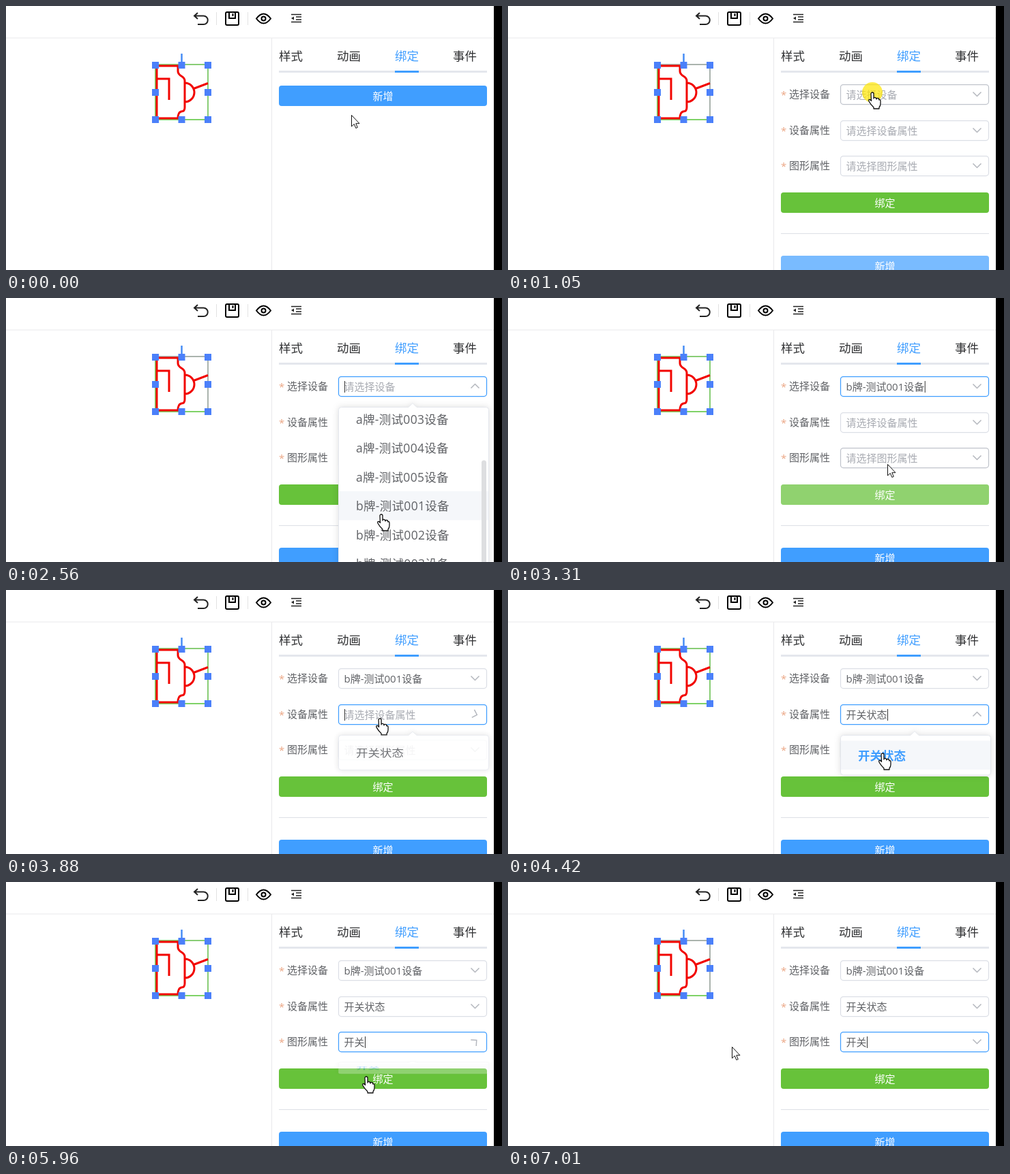
An HTML page for the animation above (7080 ms loop, 727 by 388 pixels).

```html
<!DOCTYPE html>
<html lang="zh-CN">
<head>
<meta charset="utf-8">
<style>
html, body { margin: 0; width: 100%; height: 100%; overflow: hidden; background: #fff; }
svg { display: block; }
text { font: 15px "Open Sans", "Noto Sans CJK SC", "Noto Sans CJK", sans-serif; fill: #606266; }
.big { font-size: 17.5px; }
.mid { text-anchor: middle; fill: #fff; }
.line { fill: none; stroke: #222; stroke-width: 2; }
.panel { filter: drop-shadow(0 0 5px rgba(0,0,0,.13)); }
</style>
</head>
<body>
<svg id="stage" width="727" height="388">
  <path d="M0 47H715M389.500 47V388" stroke="#e9e9eb" fill="none"/>
  <path d="M308.500 9V28M354.500 9V28" stroke="#e2e2e2"/>
  <path class="line" d="M281 10L276 14.500L281 19M276 14.500H289.500a6.200 6.200 0 0 1 0 12.500H281"/>
  <g class="line">
    <rect x="322" y="9" width="19" height="19" rx="2" stroke="#000"/>
    <path d="M327 9V18H336V9M332.500 11V15" stroke="#000"/>
    <path d="M367 18.500Q377.500 4.500 388 18.500Q377.500 32.500 367 18.500Z" stroke="#000"/>
    <circle cx="377.500" cy="18.500" r="3" stroke="#000"/>
    <path d="M418 12.500H433M425 16H433M425 20H433M418 23.500H433" stroke-width="1.600"/>
    <path d="M422 15.500V20.500L418 18Z" fill="#222" stroke="none"/>
  </g>

  <path id="edge" d="M219 86H296V167" fill="none" stroke-width="1.500"/>
  <path d="M219 86V167H296" fill="none" stroke="#55c436" stroke-width="1.600"/>
  <path d="M221 88H252V96Q252 100 257 103T262 110V149Q262 155 257 155Q252 156 252 165H221ZM221 107H239V138M262 113A14 14 0 0 1 262 141M275 121.500L296 113.500" fill="none" stroke="#f20500" stroke-width="3"/>
  <path d="M257.500 70V84" stroke="#468cf5" stroke-width="2.500"/>
  <g id="handles" fill="#4b80fa"></g>

  <g id="tabs"></g>
  <path d="M400 96.500H705" stroke="#e4e7ed" stroke-width="3"/>
  <path d="M570 96.500H605" stroke="#409eff" stroke-width="3"/>

  <g id="form">
    <g id="rows"></g>
    <g id="bind"></g>
    <path d="M400 334.500H705" stroke="#dcdfe6"/>
  </g>
  <g id="add"></g>
  <g id="panels"></g>
  <rect x="715" width="12" height="388"/>
  <circle id="press" r="15" fill="#ffe600" opacity=".7"/>
  <g id="cursor" fill="#fff" stroke="#111" stroke-linejoin="round">
    <path id="arrow" d="M.5 .5V17L4.300 13.500L6.800 19.500L9.300 18.500L6.800 12.700H12Z"/>
    <path id="hand" stroke-width="1.300" d="M-2 2a2 2 0 0 1 4 0v7q0-2 2-1.500 2 .3 2 2.500 .2-2 2-1.500 2 .3 1.800 2.500 2-1 2.200 1.500v4q0 3-2 5.500v2h-8v-2q-5-5-7-9-1-2.500 1-2.500 1.500 0 2.500 2z"/>
  </g>
</svg>
<script>
const LOOP = 7080, ROW = 42.5, SCROLL = 97;
const NS = 'http://www.w3.org/2000/svg';
const $ = id => document.getElementById(id);
const clamp = v => Math.max(0, Math.min(1, v));
const ramp = (t, a, ms) => clamp((t - a) / ms);
const smooth = u => u * u * (3 - 2 * u);
const between = (t, a, b) => t >= a && t < b;
const fade = (t, a, b) => ramp(t, a, 100) - ramp(t, b, 100);
const show = (el, on) => el.setAttribute('visibility', on ? 'inherit' : 'hidden');

function make(parent, tag, attrs, content) {
  const el = document.createElementNS(NS, tag);
  for (const k in attrs) el.setAttribute(k, attrs[k]);
  if (content) el.textContent = content;
  parent.append(el);
  return el;
}

function button(g, label, color) {
  const box = { x: 400, width: 305, height: 30, rx: 4 };
  make(g, 'rect', { ...box, fill: color });
  const glow = make(g, 'rect', { ...box, fill: '#fff' });
  make(g, 'text', { x: 552.5, y: 20.5, class: 'mid' }, label);
  return glow;
}

for (const x of [219, 257.5, 296]) for (const y of [87, 127, 167])
  if (x != 257.5 || y != 127)
    make($('handles'), 'rect', { x: x - 5, y: y - 5, width: 10, height: 10 });

['样式', '动画', '绑定', '事件'].forEach((s, i) =>
  make($('tabs'), 'text', { x: 400 + 85 * i, y: 80, class: 'big', style: 'fill:' + (i == 2 ? '#409eff' : '#303133') }, s));

const addGlow = button($('add'), '新增', '#409eff');
const bindGlow = button($('bind'), '绑定', '#67c23a');
$('bind').setAttribute('transform', 'translate(0 274)');

const devices = [...'ab'].flatMap(c => [1, 2, 3, 4, 5].map(n => `${c}牌-测试00${n}设备`));
const selects = [
  { label: '选择设备', y: 115, open: 1110, close: 2930, blur: 3760, items: devices, pick: 5, height: 342 },
  { label: '设备属性', y: 168, open: 3760, close: 4430, blur: 5220, items: ['开关状态'], pick: 0, height: 59 },
  { label: '图形属性', y: 220, open: 5220, close: 5880, blur: LOOP, items: ['开关'], pick: 0, height: 59 }
];

for (const s of selects) {
  const g = make($('rows'), 'g', { transform: `translate(0 ${s.y})` });
  make(g, 'text', { x: 400, y: 21, style: 'fill:#eba684' }, '*');
  make(g, 'text', { x: 412, y: 20 }, s.label);
  s.box = make(g, 'rect', { x: 487.5, y: .5, width: 217, height: 29, rx: 4, fill: '#fff', 'stroke-width': 1.25 });
  s.text = make(g, 'text', { x: 495.5, y: 21 });
  s.caret = make(g, 'path', { stroke: '#333' });
  s.chevron = make(g, 'path', { d: 'M-6 -3L0 3L6 -3', fill: 'none', stroke: '#b4b7be', 'stroke-width': 1.5 });

  s.panel = make($('panels'), 'g', { class: 'panel' });
  make(s.panel, 'path', { d: `M491.500 .5H590L596 -5.500L602 .5H703.500a4 4 0 0 1 4 4V${s.height - 4}a4 4 0 0 1-4 4H491.500a4 4 0 0 1-4-4V4.500a4 4 0 0 1 4-4Z`, fill: '#fff', stroke: '#e4e7ed' });
  const view = make(s.panel, 'svg', { x: 488, y: 1, width: 219, height: s.height - 2 });
  s.list = make(view, 'g', {});
  s.rows = s.items.map((name, i) => {
    const y = 7.5 + ROW * i;
    const bg = make(s.list, 'rect', { y, width: 219, height: ROW, fill: '#f5f7fa' });
    const text = make(s.list, 'text', { x: 25, y: y + 28, class: 'big' }, name);
    if (s.items.length > 1) text.style.letterSpacing = '.3px';
    return { bg, text };
  });
  if (s.items.length > 1)
    s.thumb = make(view, 'rect', { x: 209, width: 7, height: 264, rx: 3.5, fill: '#dddee0' });
}

// time, x, y of the pointer tip
const path = [
  [0, 506, 160], [70, 506, 160], [210, 534, 129], [410, 534, 129], [1000, 534, 127],
  [1200, 534, 127], [2010, 550, 318], [2990, 550, 318], [3310, 556, 244], [3600, 548, 184],
  [3810, 548, 184], [4200, 549, 240], [4560, 549, 240], [4980, 541, 236], [5260, 541, 236],
  [5680, 528, 286], [6080, 528, 286], [6800, 328, 242], [LOOP, 328, 242]
];
const presses = [[410, 480], [1000, 1110], [2760, 2930], [3640, 3760], [4270, 4400], [5100, 5220], [5750, 5880]];

function pointer(t) {
  const i = path.findIndex(p => p[0] > t);
  const [a, x, y] = path[i - 1], [b, x2, y2] = path[i];
  const u = smooth((t - a) / (b - a));
  return [x + (x2 - x) * u, y + (y2 - y) * u];
}

function drawSelect(s, t, x, y) {
  const focused = between(t, s.open, s.blur);
  const chosen = t >= s.close - 30;
  const hover = x > 487 && x < 705 && y > s.y && y < s.y + 30;
  s.box.setAttribute('stroke', focused ? '#409eff' : hover ? '#c0c4cc' : '#dcdfe6');
  s.text.textContent = chosen ? s.items[s.pick] : '请' + (s.y == 115 ? '' : '选择').slice(0, 0) + '选择' + s.label.replace('选择', '');
  s.text.style.fill = chosen ? '#606266' : '#a8abb2';

  const end = 496.5 + (chosen ? s.text.getComputedTextLength() : 0);
  s.caret.setAttribute('d', `M${end} 7V24`);
  const since = t - (chosen ? s.close - 30 : s.open);
  show(s.caret, focused && since % 1060 < 530);

  const turn = ramp(t, s.open, 300) - ramp(t, s.close, 300);
  s.chevron.setAttribute('transform', `translate(687.500 14.500) rotate(${-180 * turn})`);

  const grow = t < s.close ? 1 - (1 - ramp(t, s.open, 300)) ** 4 : (1 - ramp(t, s.close, 300)) ** 4;
  show(s.panel, grow > .002);
  s.panel.setAttribute('opacity', grow);
  s.panel.setAttribute('transform', `translate(0 ${s.y + 45}) scale(1 ${grow})`);

  const scroll = s.thumb ? SCROLL * smooth(ramp(t, 2200, 340)) : 0;
  s.list.setAttribute('transform', `translate(0 ${-scroll})`);
  if (s.thumb) {
    s.thumb.setAttribute('y', scroll * .8);
    show(s.thumb, grow > .002 && y > s.y + 45);
  }
  const over = Math.floor((y - s.y - 53 + scroll) / ROW);
  s.rows.forEach((r, i) => {
    show(r.bg, grow > .002 && i == over);
    const on = chosen && i == s.pick;
    r.text.style.fill = on ? '#409eff' : '#606266';
    r.text.style.fontWeight = on ? 700 : 400;
  });
}

function draw(t) {
  const [x, y] = pointer(t), formOn = t >= 480;
  show($('form'), formOn);
  $('add').setAttribute('transform', `translate(0 ${formOn ? 367 : 117})`);
  addGlow.setAttribute('opacity', .3 * fade(t, 150, 1050));
  bindGlow.setAttribute('opacity', .3 * (fade(t, 3150, 3300) + fade(t, 6030, 6230)));
  const grey = between(t, 410, 3100) || t >= 6450;
  $('edge').setAttribute('stroke', grey ? '#8e9a92' : '#62bd48');
  if (formOn) selects.forEach(s => drawSelect(s, t, x, y));
  else selects.forEach(s => show(s.panel, false));

  show($('press'), presses.some(([a, b]) => between(t, a, b)));
  $('press').setAttribute('transform', `translate(${x} ${y})`);
  $('cursor').setAttribute('transform', `translate(${x} ${y})`);
  const hand = between(t, 140, 3000) || between(t, 3420, 6260);
  show($('hand'), hand);
  show($('arrow'), !hand);
}

const start = performance.now();
function tick() {
  draw((performance.now() - start) % LOOP);
  requestAnimationFrame(tick);
}
tick();
</script>
</body>
</html>
```
